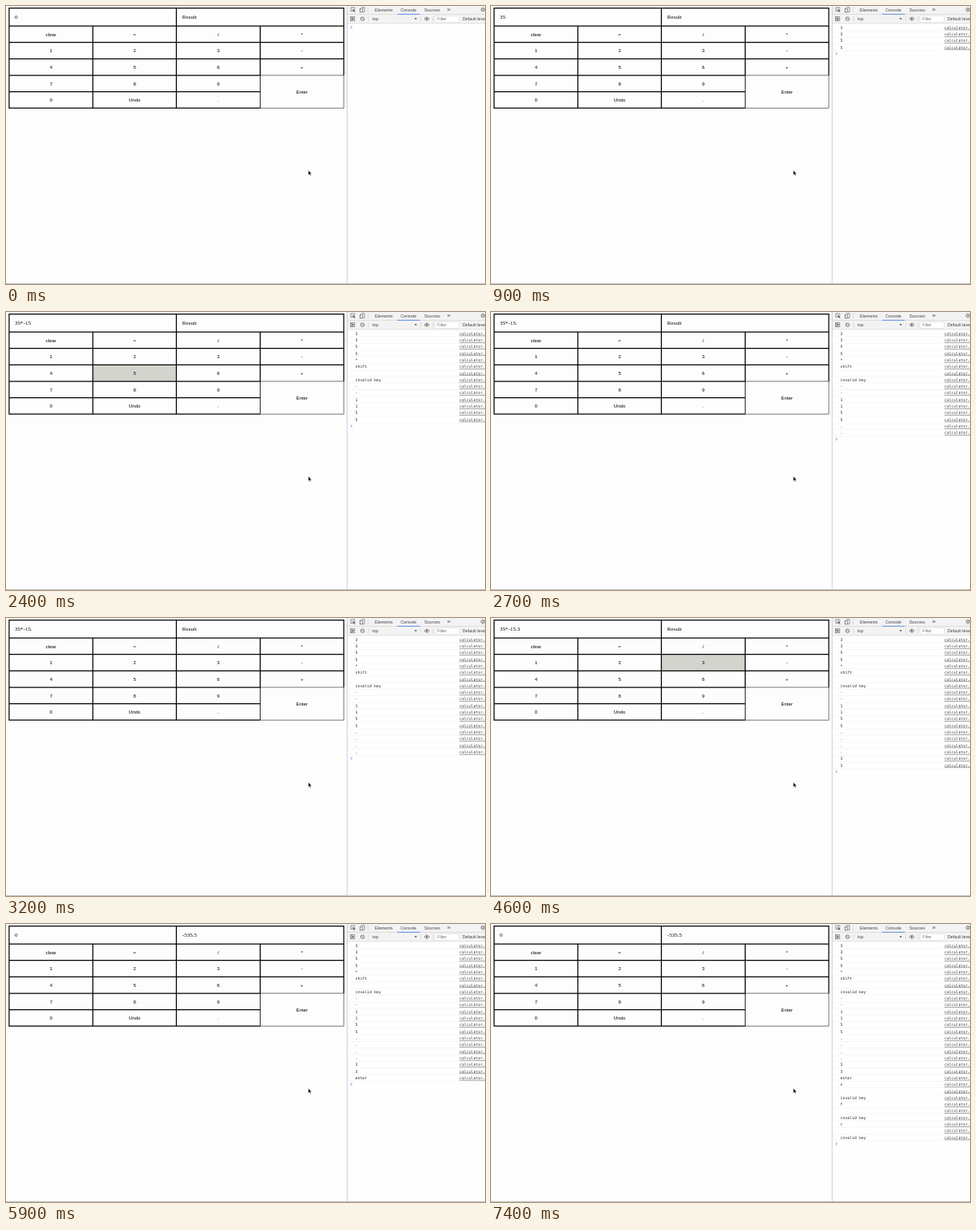
These frames come from a looping animation (600 px wide and 349 px high, 8000 ms). An HTML page:

```html
<!DOCTYPE html>
<html lang="en">
<head>
<meta charset="utf-8">
<title>Calculator with console</title>
<style>
html, body { margin: 0; width: 100%; height: 100%; overflow: hidden; background: #fdfdfd; }
svg { display: block; width: 100vw; height: 100vh; }
.key { font: 6.1px "Liberation Sans", Arial, sans-serif; text-anchor: middle; }
.screen { font: 7.1px "Liberation Serif", Times, serif; }
.ui { font: 5.4px "Liberation Sans", Arial, sans-serif; fill: #444; }
.log { font: 4.85px "DejaVu Sans Mono", monospace; fill: #2a2a2a; }
.link { text-decoration: underline; fill: #444; }
</style>
</head>
<body>
<svg id="stage" viewBox="0 0 600 349"></svg>
<script>
const LOOP = 8000;
const LIT = '#d4d4cf';
const ROW_Y = 27, ROW_H = 8.31;
const colX = [3.9, 108.8, 213.4, 318.4, 423.1];
const rowY = [25.2, 45.6, 66.3, 87, 107.6, 128.2];

const keyRows = [
  ['clear', '=', '/', '*'],
  ['1', '2', '3', '-'],
  ['4', '5', '6', '+'],
  ['7', '8', '9'],
  ['0', 'Undo', '.']
];

// key, pressed at, released at
const presses = [
  ['3', 700, 800], ['5', 800, 900], ['*', 1200, 1400], ['-', 2000, 2200],
  ['1', 2200, 2400], ['5', 2300, 2500], ['.', 2500, 2700], ['.', 3000, 3200],
  ['3', 4600, 4800], ['Enter', 5200, 5400]
];
const entries = [
  [0, '0'], [700, '3'], [800, '35'], [1200, '35*'], [2000, '35*-'], [2200, '35*-1'],
  [2300, '35*-15'], [2500, '35*-15.'], [4600, '35*-15.3'], [5200, '0']
];
const results = [[0, 'Result'], [5200, '-535.5']];
const invalid = (t, name) => [t, name, '', 'invalid key'];
const logs = [
  [700, '3', '3'], [800, '5', '5'], [1200, '*'], invalid(1300, 'shift'),
  [2000, '-', '-'], [2200, '1', '1'], [2300, '5', '5'], [2500, '.', '.'],
  [3000, '.', '.'], [4600, '3', '3'], [5200, 'enter'],
  invalid(6400, 's'), invalid(6700, 'f'), invalid(7400, 'r')
];

const stage = document.getElementById('stage');

function add(tag, attrs, text, parent = stage) {
  const el = document.createElementNS('http://www.w3.org/2000/svg', tag);
  for (const name in attrs) el.setAttribute(name, attrs[name]);
  if (text !== undefined) el.textContent = text;
  parent.appendChild(el);
  return el;
}
const rect = (x, y, width, height, fill, more) => add('rect', { x, y, width, height, fill, ...more });
const path = (d, stroke, width = 1, fill = 'none') => add('path', { d, stroke, 'stroke-width': width, fill });
const label = (x, y, text, cls, parent) => add('text', { x, y, class: cls }, text, parent);

const keys = {};
function addKey(name, x0, y0, x1, y1) {
  keys[name] = rect(x0, y0, x1 - x0, y1 - y0, 'none');
  label((x0 + x1) / 2, (y0 + y1) / 2 + 2.2, name, 'key');
}

function drawCalculator() {
  keyRows.forEach((row, r) => row.forEach((name, c) =>
    addKey(name, colX[c], rowY[r], colX[c + 1], rowY[r + 1])));
  addKey('Enter', colX[3], rowY[3], colX[4], rowY[5]);

  const [left, , mid, enterX, right] = colX;
  const [top, , , enterY, , bottom] = rowY;
  path(`M${enterX} ${enterY}H${right}V${bottom}H${enterX}`, '#666', 0.9);
  path(`M${enterX} ${enterY}V${bottom}`, '#222', 1);
  let d = `M${left} 2.5H${right}V${enterY}M${left} 2V${bottom + 0.5}M${mid} 2.5V${top}`;
  rowY.forEach((y, i) => d += `M${left} ${y}H${i < 3 ? right : enterX}`);
  d += `M${colX[1]} ${top}V${bottom}M${mid} ${top}V${bottom}M${enterX} ${top}V${enterY}`;
  path(d, '#000', 1.25);
}

function drawDevtools() {
  rect(427, 0, 173, 348, '#fefefe');
  rect(427, 0, 173, 21.6, '#f3f3f3');
  path('M427 10.4H600M427 21.8H600', '#ccc', 0.6);
  path('M427.3 0V348', '#c4c4c4', 0.8);
  path('M490 10.3H518.5', '#4a86e8', 0.9);
  path('M453.5 1.8V8.4M454 13V19.4M519.5 13V19.4M535 13V19.4', '#ccc', 0.6);

  // inspect and device icons
  path('M434 6.5H432V2H437V3.6', '#666', 0.7);
  path('M434.2 3.8L437.8 5.3L436.3 5.9L437.6 7.5L436.9 8L435.7 6.4L434.8 7.4Z', 'none', 0, '#555');
  path('M444.5 7.4H443.6V3.2M444.6 1.8H449V7.4H446.6', '#666', 0.7);
  rect(443.3, 3.6, 3, 4.2, '#f3f3f3', { stroke: '#666', 'stroke-width': 0.7 });

  label(462, 6.5, 'Elements', 'ui');
  label(494.2, 6.5, 'Console', 'ui');
  label(524, 6.5, 'Sources', 'ui');
  label(552.6, 6.8, '»', 'ui').style.fontSize = '8px';
  add('circle', { cx: 597.4, cy: 4.6, r: 1.6, fill: 'none', stroke: '#666', 'stroke-width': 1 });
  add('circle', { cx: 597.4, cy: 4.6, r: 2.5, fill: 'none', stroke: '#666',
    'stroke-width': 0.8, 'stroke-dasharray': '1 .96' });

  // console toolbar
  rect(431.6, 13.7, 5.2, 4.8, 'none', { stroke: '#666', 'stroke-width': 0.7 });
  path('M433.3 14.6L436 16.1L433.3 17.6ZM432.8 13.7V18.5', '#666', 0.4, '#666');
  add('circle', { cx: 446.6, cy: 16.1, r: 2.3, fill: 'none', stroke: '#666', 'stroke-width': 0.8 });
  path('M445 14.5L448.2 17.7', '#666', 0.8);
  label(459, 18, 'top', 'ui');
  path('M511.6 15.1H514.8L513.2 17.5Z', 'none', 0, '#666');
  path('M524 16.1Q527.1 12 530.2 16.1Q527.1 20.2 524 16.1Z', '#666', 0.8);
  add('circle', { cx: 527.1, cy: 16.1, r: 1.1, fill: '#555' });
  rect(537.6, 12.4, 29.8, 7.8, '#fff', { stroke: '#ddd', 'stroke-width': 0.5 });
  label(540.2, 18, 'Filter', 'ui').style.fill = '#777';
  label(571.7, 18, 'Default levels', 'ui');
}

function addLogRow(text, i) {
  const g = add('g', {});
  const y = ROW_Y + i * ROW_H;
  label(437.6, y + 1.7, text, 'log', g);
  label(568, y + 1.7, 'calculator.js', 'log link', g);
  add('path', { d: `M427.6 ${y + 4.1}H600`, stroke: '#ececec', 'stroke-width': 0.5 }, undefined, g);
  return g;
}

drawCalculator();
drawDevtools();
const entry = label(11, 16.4, '', 'screen');
const result = label(220.8, 16.4, '', 'screen');
const rows = logs.flatMap(([at, ...lines]) => lines.map(text => ({ at, text })));
rows.forEach((row, i) => row.el = addLogRow(row.text, i));
const prompt = path('M431.8 -1.4L433.5 0L431.8 1.4', '#4285f4', 0.8);
path('M0 348.4H600', '#b8b8b8', 0.9);
path('M378.7 206.2V212.4L380.1 211.1L381.1 213.3L382.1 212.8L381.2 210.7H383Z', '#fff', 0.5, '#000');

const latest = (list, t) => list.filter(([at]) => at <= t).pop()[1];

function render(t) {
  entry.textContent = latest(entries, t);
  result.textContent = latest(results, t);
  for (const name in keys) {
    const lit = presses.some(([key, on, off]) => key === name && t >= on && t < off);
    keys[name].setAttribute('fill', lit ? LIT : 'none');
  }
  let count = 0;
  for (const { at, el } of rows) {
    const shown = at <= t;
    el.style.display = shown ? '' : 'none';
    if (shown) count++;
  }
  prompt.setAttribute('transform', `translate(0 ${ROW_Y - 0.3 + count * ROW_H})`);
}

const start = performance.now();
function tick() {
  render((performance.now() - start) % LOOP);
  requestAnimationFrame(tick);
}
tick();
</script>
</body>
</html>
```
